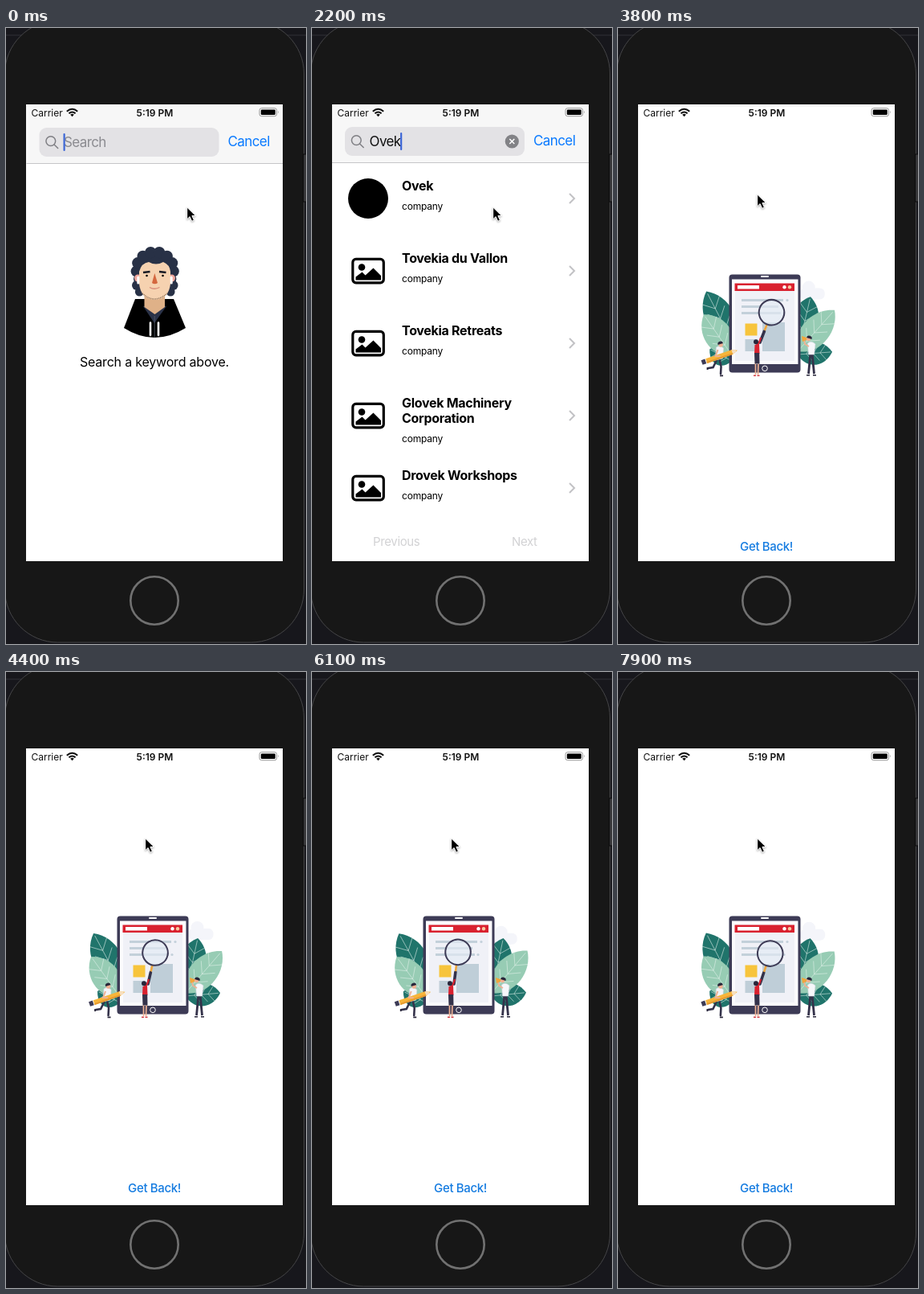
An HTML page that plays this animation: 374 px wide and 766 px high, repeating every 8000 ms.

```html
<!DOCTYPE html>
<html lang="en">
<head>
<meta charset="utf-8">
<title>Company search</title>
<style>
html, body { margin: 0; width: 100%; height: 100%; overflow: hidden; background: #17171c; }
svg { display: block; width: 374px; height: 766px; }
text { font-family: Inter, "Open Sans", sans-serif; white-space: pre; }
.status { font-size: 12px; fill: #111; }
.field { font-size: 17px; letter-spacing: -.6px; }
.message { font-size: 16px; letter-spacing: -.2px; }
.title { font-size: 16px; font-weight: 700; letter-spacing: -.3px; }
.kind { font-size: 12px; letter-spacing: -.2px; }
.button { font-size: 15px; letter-spacing: -.37px; }
</style>
</head>
<body>
<svg viewBox="0 0 374 766">
  <defs>
    <clipPath id="screen"><rect x="25" y="95" width="320" height="568"/></clipPath>
    <g id="picture">
      <rect x="-19.200" y="-14.600" width="38.500" height="29.400" rx="4" fill="none" stroke="#000" stroke-width="3.200"/>
      <circle cx="-8" cy="-4.500" r="4.300"/>
      <path d="M-15.500 11.500v-4l8-6 4 4 10-9 9.500 9.500v5.500z"/>
    </g>
  </defs>

  <path d="M0 9H374" stroke="#303036"/>
  <rect x="-1.5" y="-9" width="373" height="773" rx="66" fill="#171717" stroke="#454547"/>
  <rect x="370.500" y="157" width="5" height="59" fill="#363638" stroke="#0b0b0b"/>
  <circle cx="185" cy="712" r="29.7" fill="#171717" stroke="#717171" stroke-width="2.6"/>

  <g clip-path="url(#screen)">
    <rect x="25" y="95" width="320" height="568" fill="#fff"/>

    <g id="empty">
      <path d="M161 337H209L224 373Q185 397 147 373Z"/>
      <path d="M171 346L185 367 200 346Z" fill="#2a3248"/>
      <path d="M185.2 358V385" stroke="#555b68" stroke-width=".8"/>
      <path d="M180 366.500V382M190 366.500V382" stroke="#fff" stroke-width="2.6" stroke-linecap="round"/>
      <path d="M172.500 326H198V347L185.500 356 172.500 347Z" fill="#dfb188"/>
      <g id="head">
        <g id="hair" fill="#283146"></g>
        <circle cx="164.500" cy="311" r="4.500" fill="#f0a79d"/>
        <circle cx="206.500" cy="311" r="4.500" fill="#f0a79d"/>
        <path d="M166 303Q169 292 178 291 187 296 196 291 204 294 205 303V318Q203 337 185.500 338 168 337 166 318Z" fill="#f6d2b0"/>
        <path d="M170 330Q185 344 201 330" fill="none" stroke="#8d7158" stroke-width="1.600" stroke-dasharray="1 1"/>
        <path d="M171 304L179.500 303M191 303L199.500 304" stroke="#171b25" stroke-width="2.600"/>
        <circle cx="175.500" cy="308" r="1.300"/><circle cx="195.500" cy="308" r="1.300"/>
        <path d="M185.300 305L189 317Q185.500 319.500 182 317Z" fill="#d4673f"/>
        <path d="M179 322.500Q185 326 191.500 322.500" fill="none" stroke="#d88a78" stroke-width="1.300"/>
        <path d="M164.800 310V317M206.200 310V317" stroke="#fff" stroke-width="3" stroke-linecap="round"/>
      </g>
      <text class="message" x="185" y="421" text-anchor="middle">Search a keyword above.</text>
    </g>

    <g id="list"></g>

    <g id="header">
      <rect x="25" y="90" width="320" height="77" fill="#f7f7f7"/>
      <path d="M25 167.500H345" stroke="#c6c6c8"/>
      <rect x="41" y="123" width="224" height="36" rx="9" fill="#e3e2e5"/>
      <g fill="none" stroke="#7f7f84" stroke-width="1.500" stroke-linecap="round"><circle cx="55.300" cy="139.600" r="5.900"/><path d="M59.800 144.200L64.200 148.500"/></g>
      <text id="query" class="field" x="71.500" y="147"></text>
      <rect id="caret" y="130" width="2.200" height="22" rx="1" fill="#3c66d6"/>
      <g id="clear"><circle cx="249.300" cy="141" r="8.600" fill="#828286"/><path d="M246.300 138l6 6m0-6l-6 6" stroke="#fff" stroke-width="1.500"/></g>
      <text class="field" x="276" y="146" fill="#0a7aff">Cancel</text>
    </g>

    <g id="modal">
      <rect x="25" y="95" width="320" height="568" fill="#fff"/>
      <g id="cloud" fill="#f4f5fa"><circle cx="237" cy="318" r="8"/><rect x="226" y="319" width="31" height="14" rx="6"/></g>
      <g id="leaves"></g>
      <rect x="138.500" y="303.500" width="89" height="122" rx="4" fill="#3d3b56"/>
      <rect x="142" y="309.500" width="82.500" height="105.500" fill="#fbfbfd"/>
      <rect x="146" y="324" width="74" height="87" fill="#f0f1f7"/>
      <rect x="178" y="305" width="10" height="2" rx="1" fill="#fff"/>
      <circle cx="183" cy="420.300" r="3.300" fill="none" stroke="#fff"/>
      <rect x="145.500" y="314.500" width="74.500" height="9.500" fill="#d9212f"/>
      <rect x="149" y="317" width="27" height="4.500" fill="#fff"/>
      <circle cx="207.500" cy="319.300" r="2.200" fill="#fff"/><circle cx="214" cy="319.300" r="2.200" fill="#f8c9a0"/>
      <path d="M154 335.500H206M154 343.500H200M154 351.500H203" stroke="#c3d0da" stroke-width="3"/>
      <g fill="#c3d0da"><circle cx="211" cy="335.500" r="1.600"/><circle cx="207" cy="351.500" r="1.600"/></g>
      <path d="M158.500 384h15v15h-15zM180 363h28v36h-28z" fill="#bfced8"/>
      <path d="M158.500 364.500h15v15h-15z" fill="#f7c43c"/>

      <g id="lens">
        <path d="M177 388V373" stroke="#34324a" stroke-width="3.600" stroke-linecap="round"/>
        <path d="M177 372V364" stroke="#f0a63c" stroke-width="2.600"/>
        <circle cx="177" cy="348" r="15.800" fill="#e3ebf5" fill-opacity=".65" stroke="#3d3b56" stroke-width="2"/>
      </g>

      <path d="M171.500 413V428M175 413L174.500 428" stroke="#eeb194" stroke-width="1.700"/>
      <path d="M169 429.300h3M173.500 429.300h3" stroke="#d43b42" stroke-width="1.500"/>
      <path d="M172 393L176.500 387 178 382" fill="none" stroke="#d9212f" stroke-width="2.200"/>
      <path d="M170.500 391L176 390 176.500 402H170Z" fill="#d9212f"/>
      <path d="M170 401H176.200L176.500 414.500H170.500Z" fill="#34324a"/>
      <circle cx="172" cy="387.300" r="3" fill="#28263a"/>

      <g id="runner">
        <g fill="none" stroke="#34324a" stroke-width="2.600" stroke-linecap="round"><path d="M123 409L118 419 112 420M126 409L128 418 127.500 427"/></g>
        <path d="M126.500 429.300h4M111 419v3" stroke="#28263a" stroke-width="1.800"/>
        <path d="M122 394Q126 391 131 395L130 408 121 410Z" fill="#f3f4f8" stroke="#d5d8e4" stroke-width=".6"/>
        <circle cx="127.500" cy="391" r="2.800" fill="#efb193"/><path d="M124 391a3.300 3.300 0 0 1 6.500-2z" fill="#28263a"/>
        <g transform="translate(104 413) rotate(-19)">
          <path d="M6-3H40L47 0 40 3H6Z" fill="#f7b53a"/>
          <path d="M6 1H40V3H6Z" fill="#e79b30"/>
          <path d="M0-3h5v6h-5z" fill="#3d3b56"/><path d="M40-3L45-1V1L40 3Z" fill="#f7dfc0"/>
        </g>
        <path d="M124 397L121 405 127 405" fill="none" stroke="#efb193" stroke-width="2"/>
      </g>

      <path d="M240 401L237.500 427M242 401L244.500 427" stroke="#34324a" stroke-width="2.800"/>
      <path d="M235 428.700h4M243 428.700h4" stroke="#28263a" stroke-width="1.500"/>
      <path d="M236.500 389Q241 385 246 390L244.500 403H237.500Z" fill="#f6f7fa" stroke="#d5d8e4" stroke-width=".6"/>
      <path d="M238 393L233 390 232 384" fill="none" stroke="#efb193" stroke-width="1.800"/>
      <circle cx="237.500" cy="383.500" r="2.800" fill="#efb193"/><path d="M235 382a3.300 3.300 0 0 1 6.500 2z" fill="#28263a"/>
      <path d="M229 380L235 382V385L230 387Z" fill="#f0a63c"/>
      <text class="button" x="185" y="647" text-anchor="middle" fill="#147be0" font-weight="500">Get Back!</text>
    </g>

    <text class="status" x="31.500" y="109.500">Carrier</text>
    <text class="status" x="185.500" y="109.500" text-anchor="middle" font-weight="600">5:19 PM</text>
    <path d="M75.800 103.800Q82.500 97.600 89.200 103.800M78.400 106.300Q82.500 102.600 86.600 106.300" fill="none" stroke="#111" stroke-width="2"/>
    <path d="M80.200 107.700Q82.500 105.900 84.800 107.700L82.500 110.200Z" fill="#111"/>
    <rect x="316" y="99.700" width="21.500" height="10" rx="2.600" fill="none" stroke="#999"/>
    <rect x="317.800" y="101.400" width="18" height="6.700" rx="1.300"/>
    <path d="M339 102.800q1.600 1.900 0 3.800z" fill="#999"/>
  </g>

  <path id="pointer" d="M0 0V14.800L3.400 11.600 6 17.300 8.700 16.100 6.200 10.500H10.700Z" stroke="#fff" stroke-width="1" style="filter:drop-shadow(0 1px 1px #0005)"/>
</svg>
<script>
const $ = id => document.getElementById(id);
const LOOP = 8000, STEP = 100;
const WORD = 'Ovek', KEY_TIMES = [500, 700, 1000, 1200];
const LIST_AT = 2100, LOGO_AT = 2200, BLUR_AT = 2500, MODAL_AT = 3290;
const companies = [[WORD], ['Tovekia du Vallon'], ['Tovekia Retreats'],
  ['Glovek Machinery', 'Corporation'], ['Drovek Workshops']];

// Curls on a ring around the face
let curls = '<path d="M165 292Q185 270 206 292L207 304H164Z"/>';
for (let i = 0; i < 10; i++) {
  const a = Math.PI * (0.82 + i * 1.36 / 9);
  curls += `<circle cx="${185.7 + 23 * Math.cos(a)}" cy="${300.5 + 22 * Math.sin(a)}" r="7.200"/>`;
}
for (const x of [163, 208.5]) curls += `<circle cx="${x}" cy="320" r="6"/><circle cx="${x + (185.7 - x) * .15}" cy="328" r="5.500"/>`;
$('hair').innerHTML = curls;

$('list').innerHTML = '<rect x="25" y="168" width="320" height="495" fill="#fff"/>' +
  companies.map((lines, i) => {
    const y = 212 + 90 * i, extra = 19 * (lines.length - 1);
    const icon = `<use href="#picture" x="70" y="${y}"${i ? '' : ' id="blank"'}/>`;
    return icon + (i ? '' : `<circle id="logo" cx="70" cy="${y}" r="25"/>`) +
      lines.map((s, n) => `<text class="title" x="112" y="${y - 10 + 19 * n}">${s}</text>`).join('') +
      `<text class="kind" x="112" y="${y + 14 + extra}">company</text>
       <path d="M321 ${y - 6}l6 6-6 6" fill="none" stroke="#c2c2c5" stroke-width="2"/>`;
  }).join('') +
  '<g class="button" fill="#d2d2d4"><text x="76" y="643.500">Previous</text><text x="249" y="643.500">Next</text></g>';

// base x, base y, tip x, tip y, bulge, colour
const DARK = '#20746b', LIGHT = '#97ccb4';
const leaves = [
  [142, 386, 109, 325, 24, DARK], [142, 411, 114, 397, 17, DARK], [142, 404, 106, 354, 23, LIGHT],
  [227, 386, 239, 331, 22, DARK], [224, 403, 267, 399, 19, DARK], [224, 399, 269, 347, 23, LIGHT]
];
$('leaves').innerHTML = leaves.map(([bx, by, tx, ty, w, fill]) => {
  const len = Math.hypot(tx - bx, ty - by), turn = Math.atan2(ty - by, tx - bx) * 180 / Math.PI;
  let veins = `M0 0H${len * .95}`;
  for (const k of [.25, .45, .65]) veins += `M${len * (k + .17)} ${-w * .5}L${len * k} 0 ${len * (k + .17)} ${w * .5}`;
  return `<g class="leaf"><g transform="translate(${bx} ${by}) rotate(${turn})">
    <path d="M0 0C${len * .2} ${-w} ${len * .75} ${-w} ${len} 0C${len * .75} ${w} ${len * .2} ${w} 0 0" fill="${fill}"/>
    <path d="${veins}" fill="none" stroke="#e4f2ec" stroke-width=".7" opacity=".75"/></g></g>`;
}).join('');
const leafNodes = document.querySelectorAll('.leaf');

const show = (id, on) => $(id).setAttribute('visibility', on ? 'visible' : 'hidden');
const move = (id, x, y) => $(id).setAttribute('transform', `translate(${x} ${y})`);

function draw(t) {
  const typed = KEY_TIMES.filter(k => t >= k).length;
  const query = $('query');
  query.textContent = typed ? WORD.slice(0, typed) : 'Search';
  query.setAttribute('fill', typed ? '#111' : '#8b8b90');
  $('caret').setAttribute('x', typed ? 71 + query.getComputedTextLength() : 71);
  move('header', typed ? 0 : .5, typed ? 0 : 1);
  show('clear', typed);
  show('caret', t < BLUR_AT);

  show('empty', t < LIST_AT);
  move('head', 0, 1.6 * (1 - Math.cos(t / 2000 * 2 * Math.PI)));
  show('list', t >= LIST_AT);
  show('blank', t >= LIST_AT && t < LOGO_AT);
  show('logo', t >= LOGO_AT);

  const p = Math.min(1, Math.max(0, (t - 2400) / 600)), ease = p * p * (3 - 2 * p);
  move('pointer', 225.7 - 52 * ease, 223 - 16 * ease);

  // Critically damped spring for the sheet
  const s = Math.max(0, t - MODAL_AT) * .01478;
  show('modal', t >= MODAL_AT);
  move('modal', 0, Math.round(568 * (1 + s) * Math.exp(-s)));

  const phase = (t - 3500) / 3850 * 2 * Math.PI, swing = Math.cos(phase);
  $('lens').setAttribute('transform', `rotate(${12 + 10.5 * swing} 177 388)`);
  move('cloud', 1.5 * Math.sin(phase), 3 - 3 * Math.sin(phase));
  move('runner', .6 * swing, 0);
  leafNodes.forEach((node, i) => node.setAttribute('transform', `rotate(${1.2 * swing} ${leaves[i][0]} ${leaves[i][1]})`));
}

function tick() {
  draw(Math.floor(performance.now() % LOOP / STEP) * STEP);
  requestAnimationFrame(tick);
}
tick();
</script>
</body>
</html>
```
